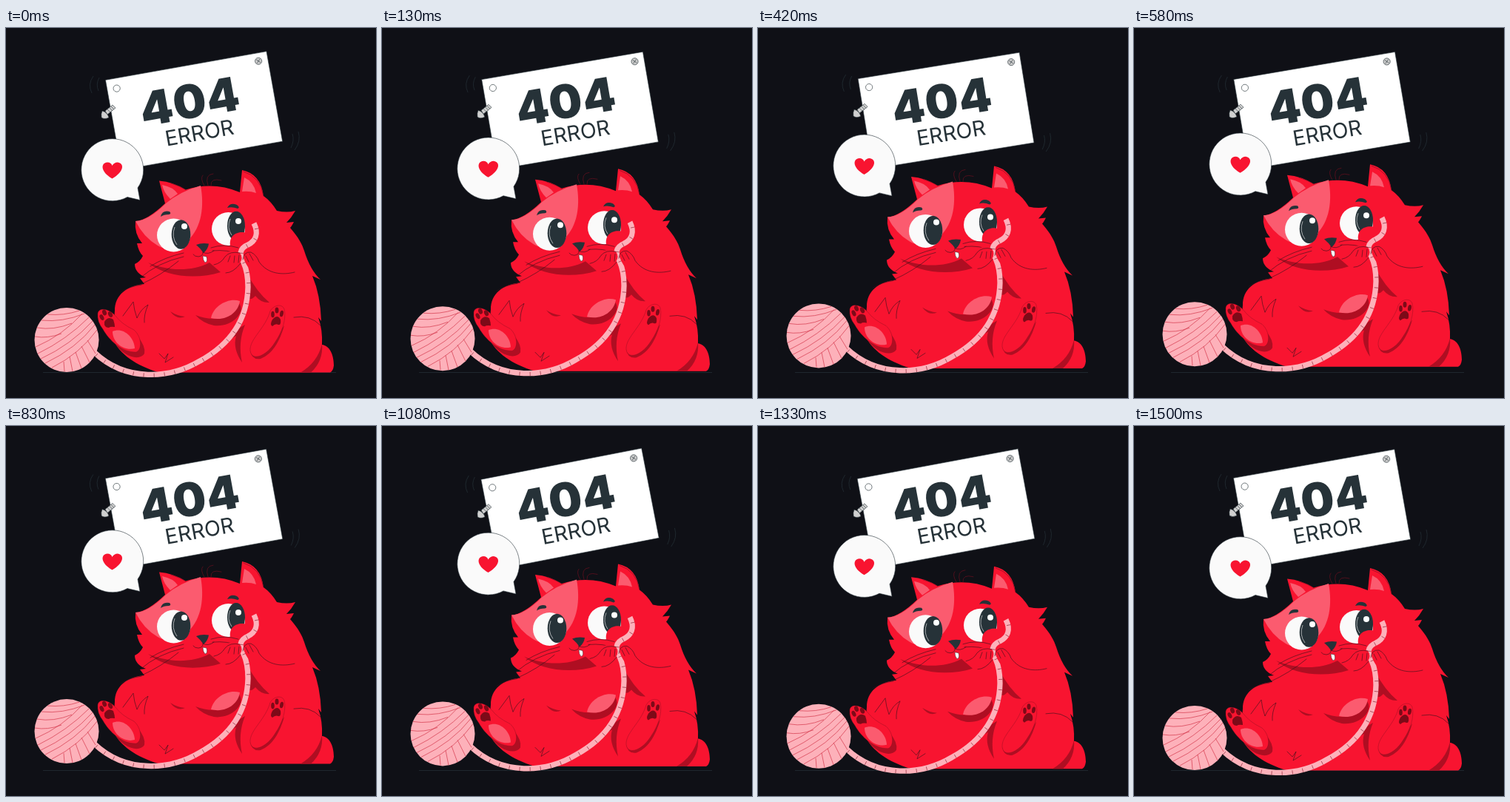
An HTML page for the animation above (1540 ms loop, 500x500 px).

```html
<!DOCTYPE html>
<html lang="en">
<head>
<meta charset="utf-8">
<title>404 error</title>
<style>
  html, body { margin: 0; height: 100%; overflow: hidden; background: #0f1016; }
  svg { display: block; width: 100vw; height: 100vh; }
  text { font-family: Inter, sans-serif; text-anchor: middle; fill: #263238; }
  .red { fill: #f81430; }
  .foot { stroke: #8a1022; stroke-width: .4; }
  .shade { fill: #af0e22; }
  .pad { fill: #7d0a18; }
  .light { fill: #fb5b6f; }
  .yarn { fill: #fdb1ba; }
  .dark { fill: #263238; }
  .white { fill: #fafafa; }
  .line { fill: none; stroke: #33141c; stroke-width: .6; stroke-linecap: round; stroke-linejoin: round; }
  .hair { stroke: #7a1020; }
  .mark { fill: none; stroke: #263238; stroke-width: .7; }
  .thread { fill: none; stroke: #d5374b; stroke-width: .7; }
  .tick { fill: none; stroke: #8d2637; stroke-width: .7; }
</style>
</head>
<body>
<svg viewBox="0 0 500 500">
  <path class="mark" d="M50 465.500H446"/>

  <g id="sign">
    <path class="mark" d="M118 65Q110 76 116 88M126 67Q121 76 125 85M395 140Q399 153 390 165M387 143Q390 152 385 162"/>
    <g transform="translate(254 111.500) rotate(-10.100)">
      <rect x="-110.500" y="-61.500" width="221" height="123.500" fill="#fff" stroke="#263238" stroke-width=".6"/>
      <g fill="#fff" stroke="#263238" stroke-width=".6">
        <circle cx="-97.500" cy="-47.700" r="4.600"/>
        <circle cx="97.500" cy="-50.500" r="4.600" fill="#ccc"/>
        <path d="M95 -53l5 5M100 -53l-5 5"/>
      </g>
      <text x="-3.500" y="9.500" font-size="63" font-weight="900" letter-spacing="1">404</text>
      <text x="2" y="41" font-size="28.500" font-weight="400">ERROR</text>
    </g>
    <g stroke="#263238" stroke-width=".6" fill="#d0d0d0">
      <path d="M134 112L144 104L148 108L137 117Z"/>
      <path d="M137 110l4 4M140 108l4 4M142 106l4 4"/>
      <path d="M130 112Q137 114 139 121Q133 124 129 121Q128 116 130 112Z"/>
    </g>
  </g>

  <g id="float">
    <path class="white" stroke="#263238" stroke-width=".6" d="M178 216A42 42 0 1 0 164 228.500L181 232.500Z"/>
    <path class="red" d="M143.500 203.500C127 194 128 182 137 181.500Q142 181.500 143.500 186Q146 181.500 151 181.500C160 183 160 194 143.500 203.500Z"/>

    <!-- body and tail -->
    <path class="red" d="M215 237L207 206.500Q226 208 243 218.500Q280 207 316 222L319 192Q344 197 348 227Q358 234 366 247Q380 250 391 247Q386 256 379 263L389 262Q386 268 384 270C396 284 400 292 403 301Q411 327 425 340L414 335Q425 361 426 396L422 391Q428 408 427 428C437 429 443 441 443 456Q442 464 438 465.500H207C175 456 154 441 144 420L147 382C147 361 163 348 187 346L181 338L189 337Q174 331 174 319Q181 316 185 308Q179 302 177 291L184 291Q173 278 175 261Q191 260 215 237Z"/>
    <path class="shade" d="M427 427Q421 452 398 465.500H412Q429 450 427 427Z"/>

    <!-- head -->
    <path class="light" d="M175 261Q193 260 216 237Q235 221 263 213C268 240 265 269 246 287C237 299 218 302 205 294Q186 283 175 261Z"/>
    <path class="light" d="M211 212Q226 215 232 224L222 231Q213 222 211 212ZM322 202Q335 208 338 223Q330 220 319 221Z"/>
    <path class="line hair" d="M268 213Q262 203 266 199M273 213Q268 198 280 197M277 213Q276 202 291 206M223 210Q236 214 243 219M321 194Q344 201 348 227"/>
    <path class="shade" d="M192 317C214 327 248 331 275 317L290 330C258 340 216 337 192 317Z"/>
    <circle class="white" cx="226.500" cy="280" r="22.500"/>
    <ellipse class="dark" cx="236.500" cy="279" rx="12.800" ry="19.700"/>
    <circle fill="#fff" cx="241" cy="268" r="4"/>
    <circle class="white" cx="300.500" cy="271.500" r="22.500"/>
    <ellipse class="dark" cx="311" cy="267.500" rx="12" ry="19.700"/>
    <circle fill="#fff" cx="314" cy="261" r="4"/>
    <path fill="none" stroke="#fafafa" stroke-width=".6" d="M228 269Q223 282 231 293M303 258Q298 270 305 280"/>
    <path class="red" d="M303 294C301 281 311 275 321 276Q332 278 332 290L320 305Z"/>
    <path class="dark" d="M209 255Q211 246 221 248Q224 251 220 252Q213 252 209 255ZM299 243Q303 235 312 239Q317 243 313 244Q305 241 299 243Z"/>
    <path class="dark" d="M257 293Q264 290 274 291.500Q273 299 267 304Q263 298 257 293Z"/>
    <path fill="#fff" stroke="#33141c" stroke-width=".5" d="M266 308L271 309Q273 316 269 317Q266 314 266 308Z"/>
    <path class="line" d="M266 303Q267 308 260 309Q255 309 253 306M266 303Q273 307 281 301M240 304Q214 310 195 322M240 309Q205 317 181 338M277 297Q295 291 314 297M279 301Q300 299 314 306"/>

    <!-- belly -->
    <path class="shade" d="M256 388C281 398 306 392 315 372C325 386 303 405 281 402Q266 399 256 388ZM222 383Q231 389 242 390Q231 395 222 383ZM326 332Q339 357 356 371Q345 372 337 362Q330 370 325 363Z"/>
    <path class="light" d="M277 392C280 376 300 364 316 369C314 384 298 397 277 392Z"/>
    <path class="line" d="M158 389L172 370Q173 381 177 392Q182 380 192 374Q186 388 187 398M207 440L214 447L219 440L215 452L226 445M155 357Q167 349 183 347M389 391Q411 387 425 402M233 315Q210 334 183 346"/>
    <path class="shade" d="M323 401Q309 408 302 421L311 416Q306 433 319 452Q313 425 323 401Z"/>

    <!-- feet -->
    <path class="shade" d="M145 423C159 446 181 450 187 440Q189 430 178 417L170 436Z"/>
    <path class="shade" d="M330 436Q332 449 344 447C361 440 370 423 376 402L363 420Z"/>
    <path class="red foot" d="M124 386C125 377 139 379 148 389Q156 400 173 408C184 418 184 435 176 438C158 439 140 423 131 407Q123 397 124 386Z"/>
    <path class="light" d="M144 410C157 404 173 416 174 433C160 437 144 426 144 410Z"/>
    <path class="red foot" d="M376 380C379 394 373 411 364 424C352 444 332 451 330 436C329 421 348 408 356 386C358 375 373 371 376 380Z"/>
    <g class="pad">
      <ellipse cx="129.500" cy="391" rx="2.600" ry="4.200" transform="rotate(-25 129.500 391)"/>
      <ellipse cx="133" cy="384.500" rx="2.800" ry="4" transform="rotate(-20 133 384.500)"/>
      <ellipse cx="141" cy="387" rx="2.800" ry="4.200" transform="rotate(-25 141 387)"/>
      <path d="M133 397Q138 389 145 394Q147 400 147 404Q141 403 139 405Q132 405 133 397Z"/>
      <ellipse cx="360.500" cy="387" rx="2.300" ry="4.300"/>
      <ellipse cx="366" cy="381.500" rx="2.500" ry="4"/>
      <ellipse cx="372.500" cy="386" rx="2.400" ry="4.300" transform="rotate(12 372.500 386)"/>
      <path d="M360 394Q367 386 371 394Q372 402 368 401Q364 399 360 403Q356 401 360 394Z"/>
    </g>

    <!-- yarn -->
    <path id="string" fill="none" stroke="#fdb1ba" stroke-width="7.300" d="M335 264C342 278 337 288 327 293C315 298 315 307 321 317C326 328 327 338 327 350C326 395 302 428 262 450C222 474 162 479 119 438"/>
    <path id="ticks" class="tick"/>
    <circle class="yarn" cx="82" cy="421.500" r="43.500"/>
    <path class="thread" d="M56 387Q78 389 99 382M48 395Q76 398 106 386M42 405Q64 409 89 399M39 417Q56 420 75 413M112 391Q82 421 43 440M117 396Q88 428 47 447M120 401Q95 433 53 453M123 408Q100 440 62 459M103 386Q77 415 40 431M78 451L79 464M86 444L90 464M94 438L102 460M102 430L113 452M110 422L121 440"/>

    <!-- paws -->
    <path class="red" d="M287 318C289 304 304 298 316 304Q321 310 316 318L302 331ZM321 311C323 300 336 299 341 313L351 328L334 330Q325 323 321 311Z"/>
    <path class="line" d="M281 320Q291 318 296 309Q303 301 316 304M303 308L300 316M309 308L308 317M315 307L314 317M320 313Q321 302 331 303Q339 307 342 316C354 333 374 334 390 330M324 308L328 316M329 305L334 314M317 318Q307 331 297 331"/>
  </g>
</svg>
<script>
  const LOOP = 1540, SWING = 1500;
  const [sign, float, string, ticks] =
    ["sign", "float", "string", "ticks"].map(id => document.getElementById(id));

  // Short cross strokes at regular steps along the string
  let d = "";
  for (let s = 8; s < string.getTotalLength(); s += 14) {
    const a = string.getPointAtLength(s), b = string.getPointAtLength(s + 1);
    const nx = (a.y - b.y) * 3.5, ny = (b.x - a.x) * 3.5;
    d += `M${a.x - nx} ${a.y - ny}L${a.x + nx / 2} ${a.y + ny / 2}`;
  }
  ticks.setAttribute("d", d);

  // Triangle wave: 0 at whole numbers, 1 halfway
  const triangle = p => 1 - Math.abs(2 * (p - Math.floor(p)) - 1);

  function draw(now) {
    const p = Math.min(now % LOOP / SWING, 1);
    const tilt = 2 * triangle(p + .25) - 1;
    float.setAttribute("transform", `translate(0 ${-10 * triangle(p)})`);
    sign.setAttribute("transform", `rotate(${tilt} 254 111.500)`);
    requestAnimationFrame(draw);
  }
  draw(performance.now());
</script>
</body>
</html>
```
